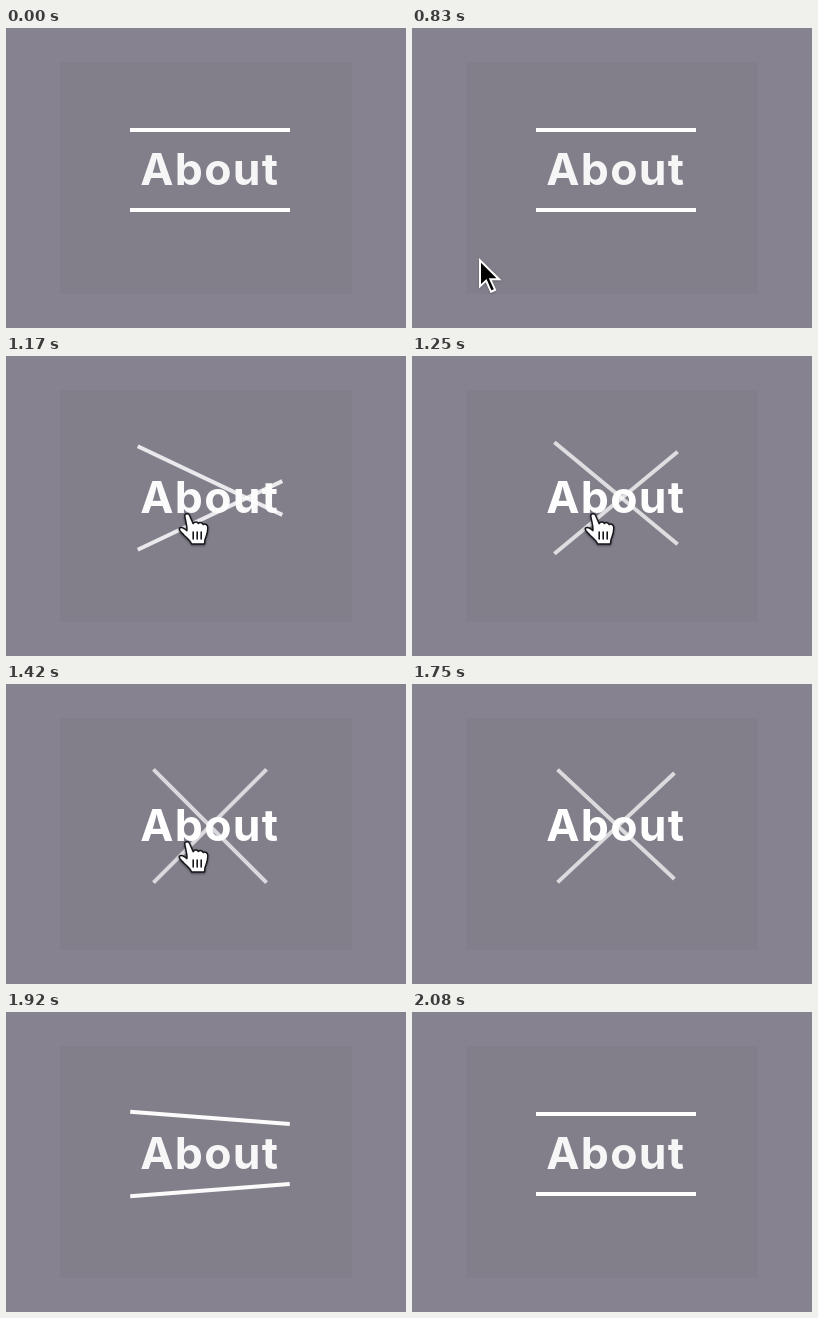
Animation, 400 px wide and 300 px high, one loop 3670 ms. Source, as an HTML page:

```html
<!DOCTYPE html>
<html lang="en">
<head>
<meta charset="utf-8">
<title>About</title>
<style>
  html, body { margin: 0; width: 100%; height: 100%; overflow: hidden; background: #878290; }
  svg { display: block; width: 400px; height: 300px; }
  text { font: 700 44.5px Inter, "Liberation Sans", sans-serif; letter-spacing: 1.3px; }
  #hand { filter: drop-shadow(0 1px 1px rgba(0, 0, 0, .45)); }
  #arrow { filter: drop-shadow(0 1px 1px rgba(0, 0, 0, .2)); }
</style>
</head>
<body>
<svg viewBox="0 0 400 300">
  <rect width="400" height="300" fill="#878290"/>
  <rect x="54" y="34" width="292" height="232" fill="#827e8a"/>
  <text id="label" x="134.3" y="156.5">About</text>
  <rect id="top" x="-80" y="-2" width="160" height="4" fill="#fff"/>
  <rect id="bottom" x="-80" y="-2" width="160" height="4" fill="#fff"/>
  <g id="arrow">
    <path d="M0 0V30.5L6.8 24.3L11.6 35L17.4 32.5L12.8 22.3H22.5Z" fill="#fff"/>
    <path d="M2 4.8V26L7.5 20.9L12.4 32.2L14.8 31.2L9.8 20.2H17.5Z" fill="#000"/>
  </g>
  <g id="hand" stroke-linecap="round" stroke-linejoin="round">
    <path d="M-2.2 2C-2.6 -.7 1.4 -1.2 2.5 1.2L6.2 9.6C7.4 7.3 10.6 7.6 11.3 9.6C12.6 8 15.6 8.4 16.2 10.6C18 9.4 20.8 10.6 20.8 13.4C20.9 19.4 19.6 21.2 18 25.6L17.5 30H4.6C3.2 26.4 -.5 23.8 -3.2 20.9C-5.2 18.6 -8.6 16.8 -7.6 14.3C-6.2 12.6 -3 13.6 -.2 16.6C.9 14-1.6 6.8-2.2 2Z" fill="#fff" stroke="#16151a" stroke-width="1.5"/>
    <path d="M6.2 18V25M10.2 18V25M14.2 18V25" fill="none" stroke="#16151a" stroke-width="1.6"/>
  </g>
</svg>
<script>
const LOOP = 3670, FADE = 300, ENTER = 1072, LEAVE = 1732;
const ticks = [0, 830, 920, 1000, 1090, 1170, 1250, 1330, 1420, 1750, 1830, 1920, 2000, 2080];
// time, x, y, shape
const moves = [
  [830, 67, 230, 'arrow'], [920, 94, 213, 'arrow'], [1000, 132, 189, 'arrow'],
  [1090, 169, 165, 'hand'], [1170, 181, 158, 'hand'], [1750, 0, 0, '']
];
const $ = id => document.getElementById(id);
const bez = (a, b, u) => 3 * a * u * (1 - u) ** 2 + 3 * b * u * u * (1 - u) + u ** 3;

// CSS "ease": cubic-bezier(.25, .1, .25, 1)
function ease(x) {
  if (x <= 0) return 0;
  if (x >= 1) return 1;
  let lo = 0, hi = 1;
  for (let i = 0; i < 24; i++) {
    const mid = (lo + hi) / 2;
    if (bez(.25, .25, mid) < x) lo = mid; else hi = mid;
  }
  return bez(.1, 1, lo);
}

function placeLine(id, y, side, p) {
  const el = $(id);
  el.setAttribute('transform', `translate(204 ${y + side * 40 * p}) rotate(${side * 45 * p})`);
  el.setAttribute('opacity', 1 - .3 * p);
}

function draw(time) {
  const t = ticks.filter(k => k <= time).pop();
  const p = ease((t - ENTER) / FADE) - ease((t - LEAVE) / FADE);
  placeLine('top', 102, 1, p);
  placeLine('bottom', 182, -1, p);
  const c = Math.round(246 + 9 * p);
  $('label').setAttribute('fill', `rgb(${c},${c},${c})`);

  const [, x, y, shape] = moves.filter(m => m[0] <= t).pop() || [0, 0, 0, ''];
  for (const id of ['arrow', 'hand']) {
    $(id).style.display = id === shape ? '' : 'none';
    $(id).setAttribute('transform', `translate(${x} ${y})`);
  }
}

const start = performance.now();
function tick() {
  draw((performance.now() - start) % LOOP);
  requestAnimationFrame(tick);
}
tick();
</script>
</body>
</html>
```
